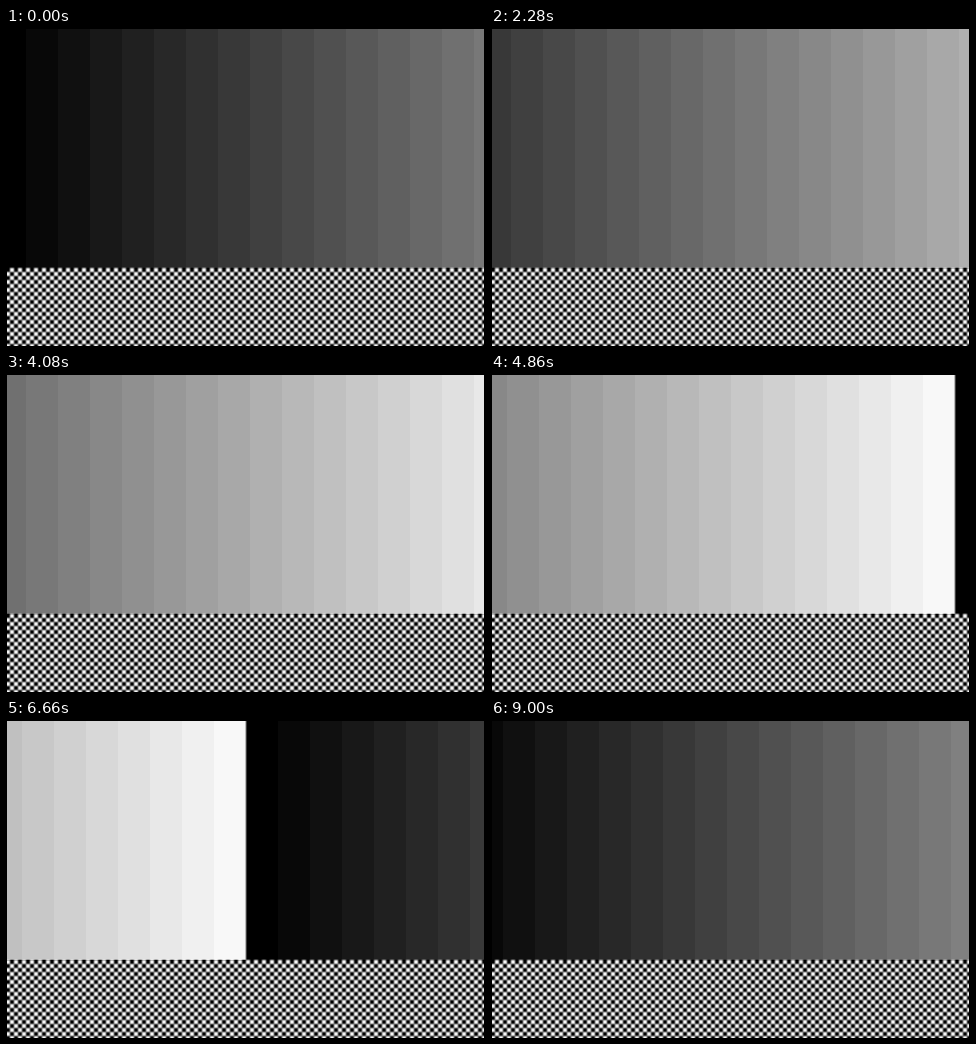
An HTML page without scripts for the animation above (9.12 s loop, 479 by 318 pixels).

```html
<!DOCTYPE html>
<html lang="en">
<head>
<meta charset="utf-8">
<title>Scrolling grey bands</title>
<style>
  html, body {
    margin: 0;
    width: 100%;
    height: 100%;
    overflow: hidden;
    background: #000;
  }

  .stage {
    position: relative;
    width: 479px;
    height: 318px;
    overflow: hidden;
  }

  .stage::after {
    content: "";
    position: absolute;
    inset: 0;
    border: solid #000;
    border-width: 1px 1px 0;
  }

  .scroll, .lag {
    position: absolute;
    inset: 0;
    animation: 9120ms -1ms infinite;
  }

  /* 8px every 60ms, held back 4px on every 7th or 8th step */
  .scroll { animation-name: scroll; }
  .lag.a { animation-name: lag-a; }
  .lag.b { animation-name: lag-b; }

  @keyframes scroll {
    0% { transform: translateX(0); }
    5.26316% { transform: translateX(0); animation-timing-function: steps(142); }
    98.68421%, 100% { transform: translateX(-1136px); }
  }

  @keyframes lag-a {
    0% { transform: translateX(0); }
    0.65789% { transform: translateX(0); animation-timing-function: steps(9); }
    89.47368%, 100% { transform: translateX(36px); }
  }

  @keyframes lag-b {
    0% { transform: translateX(0); }
    5.26316% { transform: translateX(0); animation-timing-function: steps(9); }
    94.07895%, 100% { transform: translateX(36px); }
  }

  .sky, .floor {
    position: absolute;
    left: -12px;
    width: 1624px;
  }

  .sky {
    top: 0;
    height: 240px;
    background: 0 0 / 1024px 100% repeat-x linear-gradient(90deg,
      #3e3e3e 0 1px,
      #000000 0 32px, #080808 0 64px, #101010 0 96px, #181818 0 128px,
      #202020 0 160px, #282828 0 192px, #303030 0 224px, #383838 0 256px,
      #404040 0 288px, #484848 0 320px, #505050 0 352px, #585858 0 384px,
      #606060 0 416px, #686868 0 448px, #707070 0 480px, #787878 0 512px,
      #808080 0 544px, #888888 0 576px, #909090 0 608px, #989898 0 640px,
      #a0a0a0 0 672px, #a8a8a8 0 704px, #b0b0b0 0 736px, #b8b8b8 0 768px,
      #c0c0c0 0 800px, #c8c8c8 0 832px, #d0d0d0 0 864px, #d8d8d8 0 896px,
      #e0e0e0 0 928px, #e8e8e8 0 960px, #f0f0f0 0 992px, #f8f8f8 0 1023px,
      #bababa 0);
  }

  /* Soft stripes in both directions; exclusion turns them into a checkerboard */
  .floor {
    --soft: #404040 0 1px, #000 0 3px, #404040 0 4px,
            #bfbfbf 0 5px, #fff 0 7px, #bfbfbf 0;
    top: 239px;
    height: 79px;
    background:
      linear-gradient(#f8f8f8, #f8f8f8),
      4px 0 / 8px 8px linear-gradient(90deg, var(--soft)),
      0 0 / 100% 2px no-repeat linear-gradient(#000, #000),
      0 1px / 8px 8px linear-gradient(180deg, var(--soft));
    background-blend-mode: multiply, exclusion, normal, normal;
    -webkit-mask-image: linear-gradient(rgba(0, 0, 0, .25) 0 1px, rgba(0, 0, 0, .75) 0 2px, #000 0);
    mask-image: linear-gradient(rgba(0, 0, 0, .25) 0 1px, rgba(0, 0, 0, .75) 0 2px, #000 0);
  }
</style>
</head>
<body>
  <div class="stage">
    <div class="lag a">
      <div class="lag b">
        <div class="scroll">
          <div class="sky"></div>
          <div class="floor"></div>
        </div>
      </div>
    </div>
  </div>
</body>
</html>
```
